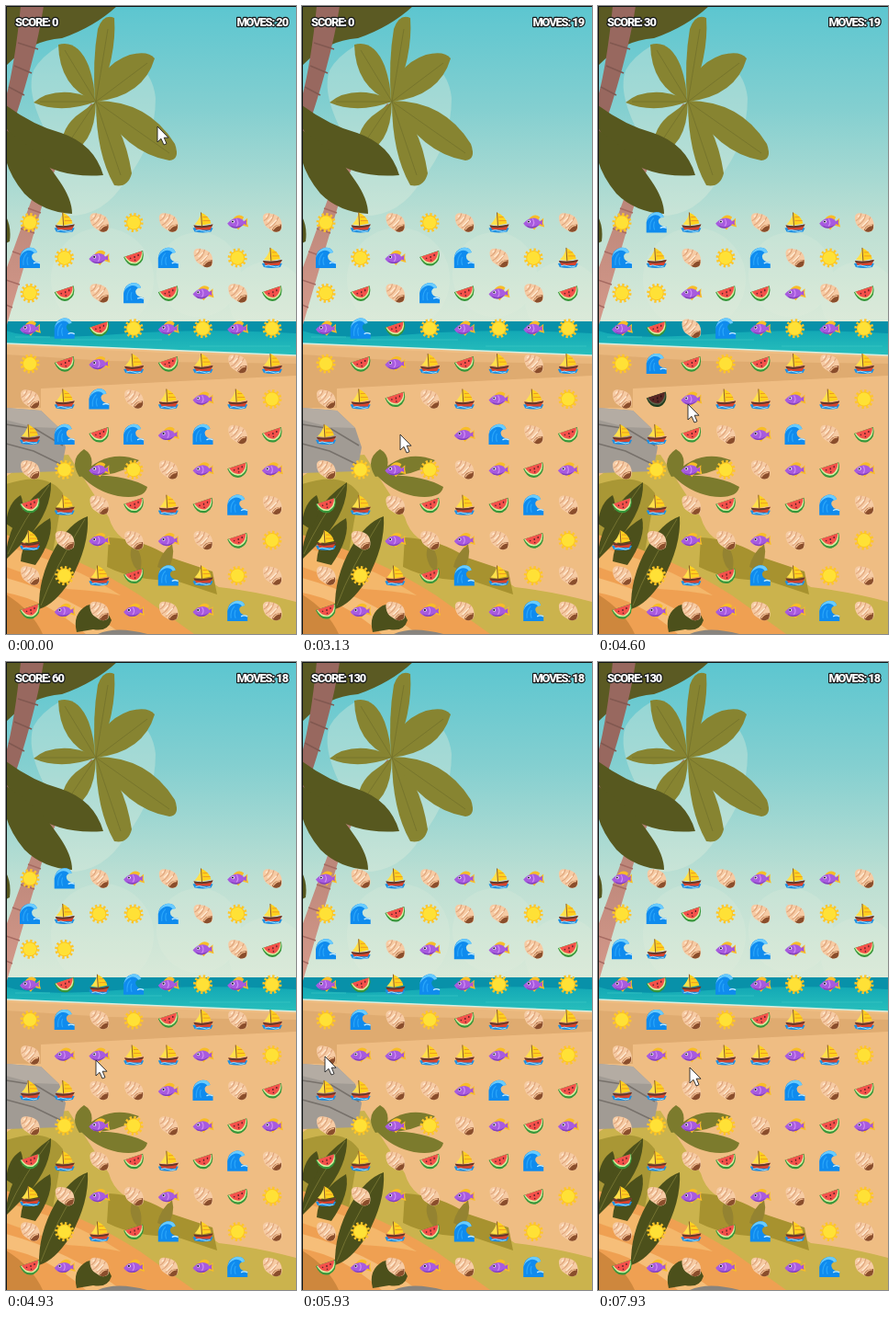
An HTML page for the animation above (8000 ms loop, 316 px wide and 683 px high).

```html
<!DOCTYPE html>
<html lang="en">
<head>
<meta charset="utf-8">
<title>Beach match</title>
<style>
html, body { margin: 0; width: 100%; height: 100%; overflow: hidden; }
svg { display: block; width: 100vw; height: 100vh; }
text {
  font: 800 12.8px Roboto, "Open Sans", sans-serif; letter-spacing: -1.1px;
  fill: #fff; stroke: #17191a; stroke-width: 2.4px; stroke-linejoin: round; paint-order: stroke;
}
.picked { filter: brightness(.42) saturate(.75); }
</style>
</head>
<body>
<svg viewBox="0 0 316 683" preserveAspectRatio="none">
<defs>
  <linearGradient id="sky" x2="0" y2="1">
    <stop offset="0" stop-color="#5cc6d0"/><stop offset=".32" stop-color="#83cfd0"/>
    <stop offset=".68" stop-color="#bcdfd3"/><stop offset="1" stop-color="#d9e9d8"/>
  </linearGradient>
  <linearGradient id="sea" x2="0" y2="1">
    <stop offset="0" stop-color="#0ba0b3"/><stop offset="1" stop-color="#2cc3bd"/>
  </linearGradient>
  <linearGradient id="bark" x2="0" y2="1">
    <stop offset="0" stop-color="#a8776c"/><stop offset="1" stop-color="#d59a8b"/>
  </linearGradient>

  <g id="S">
    <circle r="9" fill="none" stroke="#ffc629" stroke-width="3" stroke-dasharray="2.3 2.412"/>
    <circle r="8" fill="#fdc51f"/><circle r="7" fill="#ffe136"/>
  </g>
  <g id="B">
    <path d="M-11 6Q0 3 11 6L9 10Q0 12-9 10Z" fill="#1e8fe0"/>
    <path d="M-10 3Q0 5 11 2L8 8H-7Z" fill="#d8452f"/>
    <path d="M-10 3Q0 5 11 2L10 4Q0 7-9 5Z" fill="#60382b"/>
    <path d="M-2-11Q7-7 9 1L-1 3Z" fill="#ffd21f"/><path d="M-2-10Q-4-3-9 2L-1 3Z" fill="#ffe04a"/>
    <path d="M-2-11L-1 4" stroke="#8a5a2b"/>
    <path d="M0-2L8-2M0-6L5-6" stroke="#ed9d22"/>
    <path d="M-8 9Q-4 7 0 9T8 9" fill="none" stroke="#9fe0ff"/>
  </g>
  <g id="H">
    <path d="M-10-6Q-9-11-3-10Q6-9 9-4Q12 2 10 8Q6 12 0 9L-6 5Q-10 1-10-6Z" fill="#f6cba4"/>
    <path d="M-9-2Q-4-4-3-10M-7 3Q0 0 2-9M-3 6Q3 3 7-6" fill="none" stroke="#dda27a" stroke-width="1.1"/>
    <path d="M-7-6L-5-8M-5-1L0-6M-2 4L5-3" stroke="#ffe8cf" stroke-width="1.4"/>
    <path d="M0 8Q2 2 10 2Q11 9 6 10Q2 11 0 8Z" fill="#8a4e2c"/>
    <path d="M1 8Q4 3 9 3" fill="none" stroke="#efb88b" stroke-width="1.3"/>
  </g>
  <g id="F">
    <path d="M-5-4Q1-11 7-6L5-2ZM-3 4L1 8L4 4Z" fill="#f8bd27"/>
    <path d="M5 0L11-5Q10 0 12 5L5 3Z" fill="#f8bd27"/>
    <path d="M5 0L10-3Q9 0 10 3Z" fill="#a64fdb"/>
    <path d="M-11 1Q-6-5 0-5Q6-5 8 1Q4 6-2 6Q-8 6-11 1Z" fill="#a75bdf"/>
    <path d="M-8 3Q-1 7 6 2Q2 7-3 6Q-6 6-8 3Z" fill="#8240ba"/>
    <path d="M-1-4Q2 0-1 4" fill="none" stroke="#d18cf5" stroke-width="1.2"/>
    <circle cx="-5" cy="-1" r="1.7" fill="#fff"/><circle cx="-5.2" cy="-1" r="1.1" fill="#271b3c"/>
  </g>
  <g id="W">
    <path d="M-11 11V0Q-10-9-2-11Q6-12 8-6Q3-6 2-2Q2 4 11 5V11Z" fill="#0f8bee"/>
    <path d="M-11 0Q-9-9-2-11Q6-12 8-6L5-5Q2-9-3-8Q-9-6-11 0Z" fill="#6accff"/>
    <path d="M-7 8Q-8-1-3-5M-2 8Q-4 3-2-1" fill="none" stroke="#2aa6fa" stroke-width="1.2"/>
    <path d="M4 6Q7 4 11 6" stroke="#c9efff" stroke-width="1.3" fill="none"/>
  </g>
  <g id="M">
    <path d="M-11-1L10-8Q13 3 4 8Q-6 11-11-1Z" fill="#36963a"/>
    <path d="M-10-1L9.500-7Q11 2 3.500 6Q-5 8-10-1Z" fill="#d8efa0"/>
    <path d="M-9-1.500L9-7.500Q9 1 3 4.500Q-4 6-9-1.500Z" fill="#f4514b"/>
    <path d="M-4 0l1 1M1-2l0 2M5-4l0 2M1 2l1 1" stroke="#5a2027" stroke-width="1.3"/>
  </g>
</defs>

<rect width="316" height="345" fill="url(#sky)"/>
<path d="M30 70Q22 92 40 130L60 228Q105 232 130 190Q163 150 163 100Q160 72 138 60L98 104L60 42Q38 55 30 70Z" fill="#e4eedd" opacity=".35"/>
<g fill="#e8f0df" opacity=".2">
  <circle cx="105" cy="297" r="56"/><circle cx="210" cy="292" r="46"/><circle cx="285" cy="320" r="42"/>
</g>
<rect y="343" width="316" height="42" fill="url(#sea)"/>
<path d="M0 343H316V356Q210 350 120 357T0 353Z" fill="#0891a9"/>
<path d="M60 363H170M200 370H310M10 360H48" stroke="#4bd0c9" opacity=".45"/>

<path d="M0 367L316 380V683H0Z" fill="#efbd83"/>
<path d="M0 367L316 380" fill="none" stroke="#d9eee0" stroke-width="1.4"/>
<path d="M0 373L316 385V402L190 408L38 416V437H0Z" fill="#dfab70"/>
<path d="M0 370L316 383V389L110 386L0 379Z" fill="#e9b77d"/>

<path d="M0 512Q28 490 68 488L112 556Q120 584 152 588Q195 606 232 632Q275 637 316 648V683H0Z" fill="#cbb34d"/>
<path d="M0 437L38 440L58 459L65 480L60 506L0 508Z" fill="#a19b94"/>
<path d="M0 437L38 440L58 459L30 458L0 450Z" fill="#b4aca3"/>
<path d="M0 455L32 460L62 478M0 476L30 484L63 500" fill="none" stroke="#77716b" stroke-width="1.5"/>

<path d="M0 520Q45 505 62 530L50 600L0 585Z" fill="#a99735"/>
<path d="M112 578Q150 580 180 600L225 615L230 640L185 625Q140 625 110 610Z" fill="#a7922f"/>
<path d="M140 610Q132 596 139 585Q151 597 146 616ZM165 610Q168 595 181 585Q185 600 175 615Z" fill="#948331"/>
<path d="M0 575Q82 600 146 641L205 683H0Z" fill="#efa052"/>
<path d="M0 588Q70 606 125 641Q102 636 67 634L0 610Z" fill="#f4b76b"/>
<path d="M0 622Q70 641 126 683H87Q45 646 0 638Z" fill="#f6be79"/>
<path d="M0 640Q28 657 40 683H0Z" fill="#ce873d"/>

<g fill="#7c7b2d">
  <path d="M80 512Q68 493 85 482Q99 490 90 510Z"/>
  <path d="M81 511Q110 480 145 494Q125 513 81 511Z"/>
  <path d="M82 511Q128 508 154 523Q151 537 122 533Q98 528 82 511Z"/>
</g>
<g fill="#4c501b">
  <path d="M0 594Q6 548 49 518Q50 548 24 578L0 602Z"/>
  <path d="M16 604Q18 574 48 557Q53 578 32 608Z"/>
  <path d="M36 656Q35 622 53 590Q69 562 89 555Q91 587 70 625Q53 651 36 656Z"/>
  <path d="M0 563Q2 540 16 532Q23 548 9 569Z"/>
  <path d="M77 681Q72 661 88 652Q105 646 115 668Q111 681 95 678Z"/>
</g>
<path d="M38 652Q53 611 86 558M2 596Q18 560 47 521" fill="none" stroke="#747331"/>
<path d="M100 683Q120 674 154 683Z" fill="#88847e"/>

<path d="M96 108Q60 155 43 205Q22 275 0 350V287Q16 243 30 205Q55 150 93 106Z" fill="url(#bark)"/>
<path d="M85 116l5 3M75 131l6 4M64 149l7 4M52 169l8 5M33 198l12 6M24 220l14 5M16 242l15 5M7 267l17 6M0 298l15 5M0 325l7 3" stroke="#a66b62" stroke-width="1.4"/>
<g fill="#878431">
  <path d="M97 104Q94 60 100 25Q106 8 118 13Q121 55 99 104Z"/>
  <path d="M97 104Q58 88 57 42Q78 36 90 65Q97 85 97 104Z"/>
  <path d="M98 104Q60 118 30 105Q45 92 70 94Q88 96 98 104Z"/>
  <path d="M98 104Q97 155 63 161Q56 138 76 120Z"/>
  <path d="M98 104Q128 125 137 182Q133 198 118 195Q98 160 98 104Z"/>
  <path d="M98 103Q155 103 184 150Q190 167 178 168Q130 160 98 103Z"/>
  <path d="M98 104Q100 65 135 53Q155 48 162 57Q150 98 98 104Z"/>
</g>
<path d="M98 104L111 25M98 104L64 48M98 104L37 104M98 104L66 152M98 104L125 184M98 104L178 160M98 104L154 62" stroke="#73712b" stroke-width=".8"/>

<path d="M0 0H121Q96 23 61 35Q27 37 0 65Z" fill="#5b5a23"/>
<path d="M16 0H41Q32 61 0 151V99Q10 61 16 0Z" fill="#98685f"/>
<path d="M17 14l22 5M13 40l22 7M9 65l19 8M3 88l17 9M0 113l11 6" stroke="#815850" stroke-width="1.5"/>
<g fill="#57581f">
  <path d="M0 108Q30 130 60 138Q96 150 106 184Q60 188 28 165Q10 150 0 132Z"/>
  <path d="M0 135Q35 155 58 190Q72 210 72 226Q40 224 20 204Q5 186 0 168Z"/>
  <path d="M0 229Q6 240 4 256L0 258Z"/>
</g>

<path d="M.5 683V.5H316" fill="none" stroke="#101415"/>

<g id="board"></g>
<text id="score" x="10" y="21.500"></text>
<text id="moves" x="307" y="21.500" text-anchor="end"></text>
<path id="cursor" d="M0 0V17L4 13.300L7 20L10 18.700L7.200 12.200H12Z" fill="#fff" stroke="#222" stroke-width=".9"/>
</svg>

<script>
const FPS = 15, TICKS = 120;
const byId = id => document.getElementById(id);

// S sun, B boat, H shell, F fish, W wave, M melon
let grid = `SBHSHBFH WSFMWHSB SMHWMFHM FWMSFSFS SMFBMBHB HBWHBFBS
  BWMWFWHM HSFSHFMF MBHMBMWH BHFHFHMS HSBMWBSH MFHFHFWH`
  .split(/\s+/).map(row => [...row]);

const scenes = [];
let score = 0, moves = 20, picked = null;

function scene(tick, change) {
  change?.();
  scenes.push({ tick, score, moves, picked, cells: grid.flat() });
}
const pick = (row, col) => () => { picked = row * 8 + col; };
const unpick = () => { picked = null; };
const swap = (r1, c1, r2, c2) => () => {
  [grid[r1][c1], grid[r2][c2]] = [grid[r2][c2], grid[r1][c1]];
  moves--;
  unpick();
};
const clear = (...cells) => () => cells.forEach(([r, c]) => { grid[r][c] = '.'; });

// Tiles sink into gaps; fill maps a column to its new tiles, top first.
const drop = (fill = {}, points = 0) => () => {
  for (let c = 0; c < 8; c++) {
    const kept = grid.map(row => row[c]).filter(tile => tile !== '.').join('');
    const column = ((fill[c] || '') + kept).padStart(12, '.');
    grid.forEach((row, r) => { row[c] = column[r]; });
  }
  score += points;
};

scene(0);
scene(34, pick(5, 2));
scene(46, swap(5, 2, 6, 2));
scene(47, clear([6, 1], [6, 2], [6, 3]));
scene(48, drop());
scene(49, drop({ 1: 'W', 2: 'B', 3: 'F' }, 30));
scene(64, pick(5, 1));
scene(70, swap(5, 1, 5, 2));
scene(71, clear([4, 2], [5, 2], [6, 2]));
scene(72, drop());
scene(73, drop({ 2: 'HSM' }, 30));
scene(74, clear([2, 2], [2, 3], [2, 4]));
scene(75, drop({ 2: 'M', 3: 'S', 4: 'F' }, 30));
scene(76, clear([2, 0], [2, 1], [2, 2], [2, 3]));
scene(77, drop());
scene(78, drop({ 0: 'F', 1: 'H', 2: 'B', 3: 'H' }, 40));
scene(97, pick(5, 0));
scene(110, unpick);

// tick, x, y
const path = [
  [0, 165, 131], [1, 154, 121], [4, 154, 121], [5, 165, 131], [33, 165, 131],
  [34, 107, 446], [38, 107, 466], [58, 107, 466], [59, 107, 463], [62, 61, 432],
  [64, 61, 432], [69, 98, 433], [79, 98, 433], [80, 100, 432], [82, 167, 455],
  [85, 90, 481], [87, 2, 460], [89, 25, 429], [91, 25, 429], [93, 22, 429],
  [99, 22, 429], [103, 48, 431], [106, 48, 431], [109, 22, 429], [112, 22, 429],
  [115, 239, 422], [117, 170, 454], [119, 100, 441], [120, 100, 441]
];

function cursorAt(tick) {
  const i = path.findIndex(key => key[0] > tick);
  const [t0, x0, y0] = path[i - 1], [t1, x1, y1] = path[i];
  const k = (tick - t0) / (t1 - t0);
  return [x0 + (x1 - x0) * k, y0 + (y1 - y0) * k];
}

const tiles = grid.flat().map((_, i) => {
  const tile = document.createElementNS('http://www.w3.org/2000/svg', 'use');
  tile.setAttribute('x', 26 + 37.7 * (i % 8));
  tile.setAttribute('y', 235.5 + 38.4 * Math.floor(i / 8));
  return byId('board').appendChild(tile);
});

let shown;
function show(current) {
  if (current === shown) return;
  shown = current;
  tiles.forEach((tile, i) => {
    tile.setAttribute('href', '#' + current.cells[i]);
    tile.setAttribute('display', current.cells[i] === '.' ? 'none' : 'inline');
    tile.classList.toggle('picked', i === current.picked);
  });
  byId('score').textContent = `SCORE: ${current.score}`;
  byId('moves').textContent = `MOVES: ${current.moves}`;
}

const begin = performance.now();
function frame() {
  const elapsed = performance.now() - begin;
  const tick = Math.floor((elapsed + 4) * FPS / 1000) % TICKS;
  show(scenes.findLast(s => s.tick <= tick));
  byId('cursor').setAttribute('transform', `translate(${cursorAt(tick)})`);
  requestAnimationFrame(frame);
}
frame();
</script>
</body>
</html>
```
